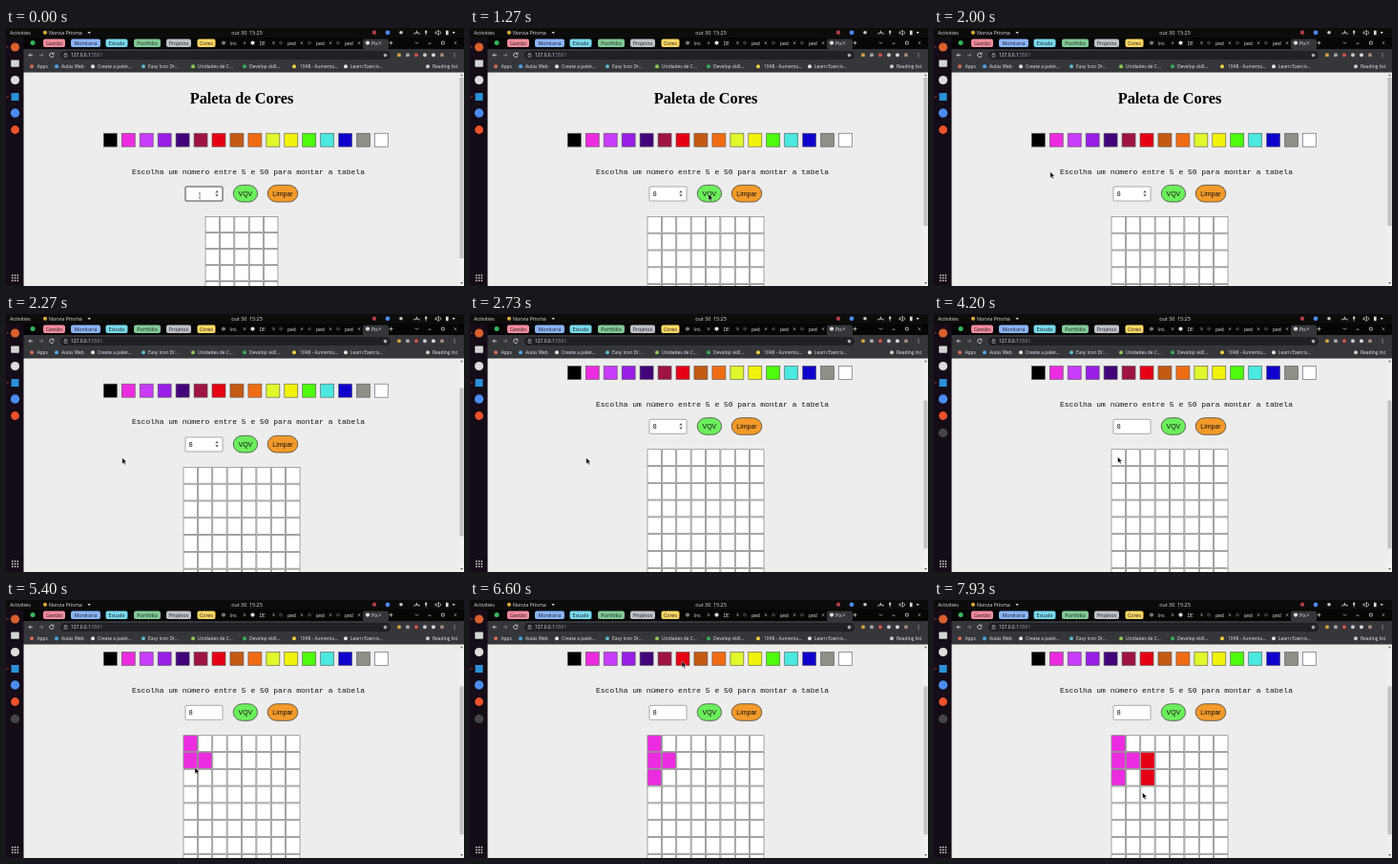
An HTML page for the animation above (8000 ms loop, 480x270 px).

```html
<!DOCTYPE html>
<html lang="pt">
<head>
<meta charset="utf-8">
<title>Paleta de Cores</title>
<style>
  html, body { margin: 0; width: 100%; height: 100%; overflow: hidden; background: #ededed; }
  svg { display: block; width: 100vw; height: 100vh; }
  text { white-space: pre; }
</style>
</head>
<body>
<svg id="stage" viewBox="0 0 480 270"></svg>
<script>
const LOOP = 8000, STEP = 200 / 3;
const UI = '"Open Sans", "Noto Sans", sans-serif';
const ARIAL = '"Liberation Sans", Arial, sans-serif';
const SERIF = '"Liberation Serif", "Times New Roman", serif';
const MONO = '"Liberation Mono", "Courier New", monospace';
const MAGENTA = '#ec2ce0', RED = '#e60014';

const stage = document.getElementById('stage');

function add(parent, tag, attrs) {
  const el = document.createElementNS('http://www.w3.org/2000/svg', tag);
  for (const key in attrs) el.setAttribute(key, attrs[key]);
  parent.appendChild(el);
  return el;
}
const group = parent => add(parent, 'g', {});
const rect = (parent, x, y, width, height, fill, more) =>
  add(parent, 'rect', { x, y, width, height, fill, ...more });
const dot = (parent, cx, cy, r, fill) => add(parent, 'circle', { cx, cy, r, fill });
const line = (parent, d, stroke, width = 0.8) =>
  add(parent, 'path', { d, fill: 'none', stroke, 'stroke-width': width });
function label(parent, x, y, words, size, fill, family = UI, more) {
  const el = add(parent, 'text', { x, y, fill, 'font-size': size, 'font-family': family, ...more });
  el.textContent = words;
  return el;
}
const show = (el, on) => el.setAttribute('visibility', on ? 'visible' : 'hidden');

// Web page
rect(stage, 18, 46, 462, 224, '#ededed');
const page = group(stage);
const middle = { 'text-anchor': 'middle' };

label(page, 247, 79, 'Paleta de Cores', 16.35, '#000', SERIF, { ...middle, 'font-weight': 700 });

['#000', MAGENTA, '#c83cfa', '#971fe6', '#43047a', '#9f1442', RED, '#c45a14',
 '#f06c14', '#dff82c', '#f2f20c', '#4cfc0c', '#4ae8e0', '#1000cc', '#8c9086', '#fff']
  .forEach((color, i) => rect(page, 102.3 + i * 18.95, 110.2, 14, 14, color,
    { stroke: '#555', 'stroke-width': 0.6 }));

label(page, 254, 152.5, 'Escolha um número entre 5 e 50 para montar a tabela', 7.98, '#111', MONO, middle);

const field = rect(page, 188, 166, 39, 15, '#fff', { rx: 0.8 });
const digit = label(page, 191.8, 175.8, '8', 7, '#111', ARIAL);
const spinner = group(page);
add(spinner, 'path', { d: 'M219.3 172.2l1.7-2.2l1.7 2.2zM219.3 174.3l1.7 2.2l1.7-2.2z', fill: '#555' });

function button(x, width, color, words) {
  rect(page, x, 164.4, width, 17.6, color, { rx: 9.5, ry: 8.8, stroke: '#333', 'stroke-width': 0.7 });
  label(page, x + width / 2, 175.7, words, 7, '#111', ARIAL, middle);
}
button(238.2, 25.4, '#6cee5c', 'VQV');
button(274.2, 31.6, '#f39a2a', 'Limpar');

function table(size, pitchY) {
  const g = group(page), cells = [];
  const pitchX = 15.38, left = 247 - size * pitchX / 2;
  for (let row = 0; row < size; row++) {
    cells.push([]);
    for (let col = 0; col < size; col++) {
      cells[row].push(rect(g, left + col * pitchX + 0.5, 197.4 + row * pitchY,
        pitchX - 1, pitchY - 1, '#fff', { stroke: '#808080', 'stroke-width': 0.7 }));
    }
  }
  return { g, cells };
}
const smallTable = table(5, 17), bigTable = table(8, 17.8);

// Scrollbar
rect(stage, 475, 46, 5, 224, '#f1f1f1');
const thumb = rect(stage, 475.5, 52, 4, 189, '#c1c1c1');
add(stage, 'path', { d: 'M476 50.2l1.5-2l1.5 2zM476 266l1.5 2l1.5-2z', fill: '#666' });

// Tab strip, toolbar, bookmarks
const chrome = group(stage);
rect(chrome, 18, 10, 462, 13, '#060607');
rect(chrome, 18, 22, 462, 24.5, '#35363a');
rect(chrome, 374, 11.5, 27, 11, '#35363a', { rx: 2 });

dot(chrome, 28, 15.6, 2.5, '#35b65a');
[['Gestão', 39, 23, '#f28b9c'], ['Monitoria', 68, 31, '#8ab4f8'], ['Estudo', 104.5, 23, '#78d9ec'],
 ['Portfólio', 134, 28, '#81c995'], ['Projetos', 168, 26, '#bdc1c6'], ['Cores', 200.5, 19, '#fdd663']]
  .forEach(([words, x, width, color]) => {
    rect(chrome, x, 11.5, width, 8.6, color, { rx: 2 });
    label(chrome, x + width / 2, 17.7, words, 5.3, '#202124', UI, middle);
  });

const cross = (x, y) => line(chrome, `M${x - 1.3} ${y - 1.3}l2.6 2.6m0-2.6l-2.6 2.6`, '#ccc', 0.6);
[['Ins', 228, '#777'], ['DE', 258.5, '#ddd'], ['ped', 288, '#333'], ['ped', 318, '#333'],
 ['ped', 348, '#333'], ['Pix', 379, '#ddd']]
  .forEach(([words, x, color], i) => {
    dot(chrome, x, 15.6, 2.1, color);
    label(chrome, x + (i === 5 ? 4 : 7), 17.5, words, 4.9, '#e8eaed');
    cross(i === 5 ? 392 : x + 22, 15.6);
  });
line(chrome, 'M401.5 15.6h4m-2-2v4M429 14.8l1.5 1.5l1.5-1.5M442.5 16.2h3M456.5 14.2h2.8v2.8h-2.8z', '#ddd', 0.7);
cross(471, 15.6);

line(chrome, 'M28 28.3h-4m1.8-1.8l-1.8 1.8l1.8 1.8', '#e0e0e0');
line(chrome, 'M35 28.3h4m-1.8-1.8l1.8 1.8l-1.8 1.8', '#888');
line(chrome, 'M49.5 26.8a2.2 2.2 0 1 0 .5 2m0-3v1.5h-1.7', '#e0e0e0');
rect(chrome, 57, 24, 346, 9, '#202124', { rx: 4.5 });
line(chrome, 'M61 27.7h3v2.6h-3zm.7 0v-1.3h1.6v1.3', '#ccc', 0.5);
const address = label(chrome, 68, 30.1, '127.0.0.1', 4.9, '#e8eaed');
const port = add(address, 'tspan', { fill: '#9aa0a6' });
port.textContent = ':5501';
add(chrome, 'path', { d: 'M397.5 26l.7 1.6l1.7.2l-1.3 1.1l.4 1.7l-1.5-.9l-1.5.9l.4-1.7l-1.3-1.1l1.7-.2z', fill: '#bbb' });
['#d8a040', '#a8a8a8', '#d05040', '#c8c8c8', '#d8d8d8', '#a88878']
  .forEach((color, i) => dot(chrome, 412 + i * 9, 28.3, 2, color));
for (let i = -1; i < 2; i++) dot(chrome, 470, 28.3 + i * 1.7, 0.5, '#ddd');

[['Apps', 32.5, '#d96a52', 27], ['Aulas Web', 58, '#4aa8e8', 53], ['Create a palet...', 96, '#e8e8e8', 91],
 ['Easy Icon Dr...', 149, '#58b8d0', 144], ['Unidades de C...', 201, '#8ec850', 196],
 ['Develop skill...', 255, '#38b058', 250], ['1048 - Aumentu...', 308, '#f0d040', 302],
 ['Learn Exercis...', 361, '#e8e8e8', 356], ['Reading list', 447, '#ccc', 442]]
  .forEach(([words, x, color, iconX]) => {
    dot(chrome, iconX, 40.2, 2, color);
    label(chrome, x, 42, words, 4.9, '#e8eaed');
  });

// Desktop bar and dock
rect(stage, 0, 0, 480, 10, '#0c0c0c');
rect(stage, 0, 10, 18.5, 260, '#140c16');
label(stage, 4, 6.8, 'Activities', 5.3, '#e4e4e4');
dot(stage, 41, 4.8, 2.1, '#d8a838');
label(stage, 45, 6.8, 'Norvia Prisma', 5.3, '#e4e4e4');
add(stage, 'path', { d: 'M85.5 4h3.4l-1.7 2.2z', fill: '#ccc' });
label(stage, 252.5, 6.8, 'out 30  15:25', 5.4, '#e4e4e4', UI, middle);
dot(stage, 386, 4.8, 2.2, '#b03c44');
dot(stage, 400, 4.8, 2.4, '#4a8cf0');
dot(stage, 414, 4.8, 1.8, '#c8c8c8');
line(stage, 'M428 6.8v-1.6h5v1.6M430.5 5.2v-2.4', '#ddd', 0.8);
rect(stage, 439.2, 2.4, 2, 3.4, '#ddd', { rx: 1 });
line(stage, 'M440.2 5.8v1.6M450 4h1.5l2-1.6v5l-2-1.6h-1.5zm5-.7q1.4 1.6 0 3.2', '#ddd', 0.7);
rect(stage, 461, 2.7, 2.6, 4.5, '#ddd');
add(stage, 'path', { d: 'M467.5 4h3.4l-1.7 2.2z', fill: '#ccc' });

dot(stage, 9.5, 20, 4.6, '#d8602c');
rect(stage, 5.2, 33.4, 8.6, 7.4, '#d4d4d4', { rx: 0.8 });
dot(stage, 9.5, 54.5, 4.6, '#e0dce0');
rect(stage, 5.5, 68, 8, 8, '#2a90d8', { rx: 0.6 });
dot(stage, 9.5, 89, 4.7, '#4a8cf0');
dot(stage, 9.5, 106.5, 4.4, '#f0522c');
const recorder = dot(stage, 9.5, 124.5, 4.7, '#444');
for (const y of [20, 72]) dot(stage, 1.8, y, 0.7, '#d84a28');
for (let i = 0; i < 9; i++) rect(stage, 6 + i % 3 * 2.8, 258 + Math.floor(i / 3) * 2.8, 1.5, 1.5, '#ddd');

// Pointers
const arrow = add(stage, 'path', {
  d: 'M0 0V6.3L1.5 5L2.6 7.3L3.7 6.8L2.6 4.6H4.6Z', fill: '#000', stroke: '#fff', 'stroke-width': 0.4
});
const beam = line(stage, 'M-1.2-2.8h2.4M0-2.8v5.6M-1.2 2.8h2.4', '#555', 0.6);

// Motion: [ms, ...values]
const POINTER = [
  [0, 203, 175.5], [333, 203, 175.5], [733, 228, 174], [1133, 250, 174], [1267, 250, 174],
  [1733, 160, 156], [2000, 121.8, 150.5], [2733, 121.8, 150.5], [2933, 126, 125], [3067, 127, 112],
  [3400, 128.5, 62], [3667, 128.5, 62], [4200, 192.5, 149.5], [4400, 192.5, 149.5],
  [4733, 203, 163], [4933, 203, 163], [5200, 195.5, 168], [5400, 198, 175.5], [5533, 193, 179],
  [5733, 193, 181], [6467, 222, 62], [6600, 222, 64], [7067, 224, 164], [7200, 224, 166],
  [7400, 224, 182], [7533, 224, 183], [7800, 219, 199], [7933, 218.5, 201.5], [8000, 218.5, 201.5]
];
const SCROLL = [[0, 0], [2067, 0], [2133, 14], [2200, 27], [2267, 37], [2333, 45], [2400, 51],
  [2467, 54], [2533, 55.7], [8000, 55.7]];
const PAINT = [[4467, 0, 0, MAGENTA], [4933, 1, 1, MAGENTA], [5200, 0, 1, MAGENTA],
  [5667, 0, 2, MAGENTA], [7133, 2, 1, RED], [7467, 2, 2, RED]];

function at(keys, t) {
  const next = keys.findIndex(key => key[0] >= t);
  if (next <= 0) return keys[0].slice(1);
  const a = keys[next - 1], b = keys[next], k = (t - a[0]) / (b[0] - a[0]);
  return a.slice(1).map((v, i) => v + (b[i + 1] - v) * k);
}

function render(now) {
  const t = Math.min(LOOP, Math.floor((now % LOOP + 4) / STEP) * STEP + 0.5);
  const [scroll] = at(SCROLL, t);
  const [x, y] = at(POINTER, t);
  const built = t >= 1266;
  const overField = x < 227 && t < 1200;

  page.setAttribute('transform', `translate(0 ${-scroll})`);
  thumb.setAttribute('y', 52 + scroll * 0.69);
  thumb.setAttribute('height', built ? 155 : 189);
  show(smallTable.g, !built);
  show(bigTable.g, built);
  show(digit, t >= 66);
  show(spinner, t < 3666);
  show(recorder, t >= 3666);
  field.setAttribute('stroke', built ? '#888' : '#333');
  field.setAttribute('stroke-width', built ? 0.7 : 0.9);

  for (const [start, col, row, color] of PAINT) {
    bigTable.cells[row][col].setAttribute('fill', t >= start ? color : '#fff');
  }
  const pointer = overField ? beam : arrow;
  show(beam, overField);
  show(arrow, !overField);
  pointer.setAttribute('transform', `translate(${x} ${y})`);
}

const begin = performance.now();
function tick() {
  render(performance.now() - begin);
  requestAnimationFrame(tick);
}
tick();
</script>
</body>
</html>
```
